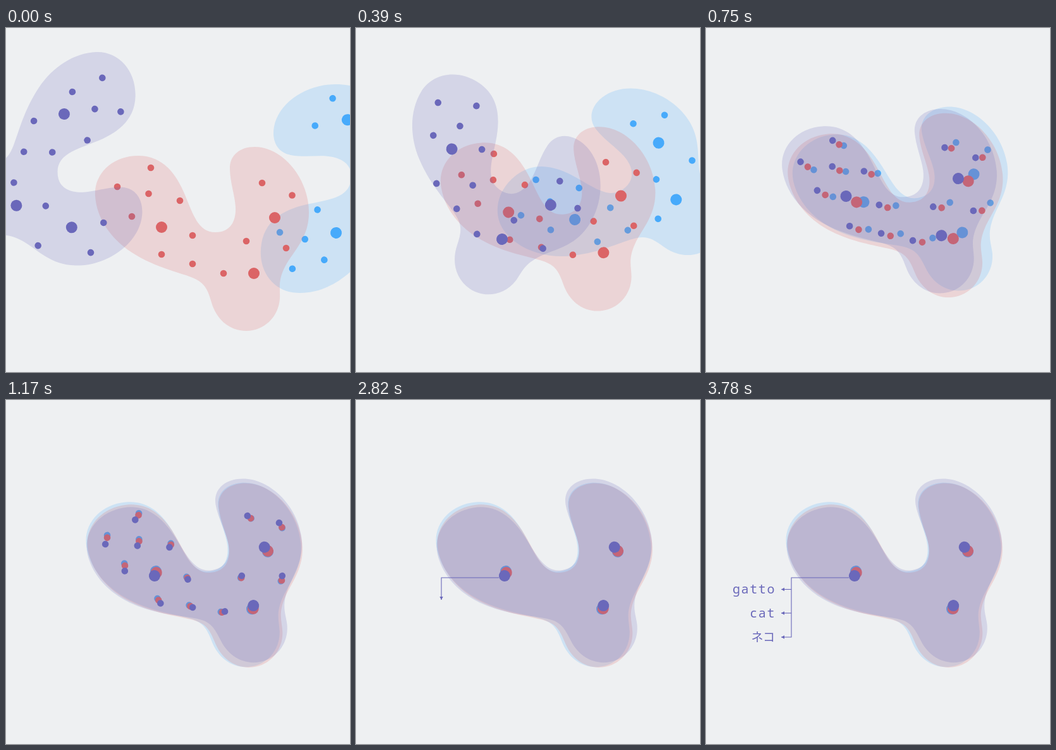
An HTML page for the animation above (3810 ms loop, 544 by 544 pixels).

```html
<!DOCTYPE html>
<html lang="en">
<head>
<meta charset="utf-8">
<title>Aligned spaces</title>
<style>
  html, body { margin: 0; width: 100%; height: 100%; overflow: hidden; background: #eef0f2; }
  svg { display: block; width: 100vw; height: 100vh; }
  text { fill: #6a68ba; text-anchor: end; font: 20px "Noto Sans Mono", monospace; letter-spacing: 1.6px; }
  .jp { font: 19px "Noto Sans CJK JP", "Noto Sans CJK", sans-serif; letter-spacing: 0; }
</style>
</head>
<body>
<svg id="stage" viewBox="0 0 544 544"></svg>
<script>
const LOOP = 3810, STEP = 30, MERGE = 960;
const INK = '#6a68ba';
const stage = document.getElementById('stage');

const OUTLINE = 'M141 265C139 231 168 202 209 202S270 233 283 264S304 323 331 323' +
  'S364 301 363 283S354 243 354 222S370 188 393 188C438 188 479 238 479 292' +
  'C479 332 455 352 442 376S434 412 433 428C431 457 408 479 380 479' +
  'S332 459 325 434S312 401 290 393S233 377 199 355S143 300 141 265Z';

// Small dots sit in slanted rows: start, step, count
const ROWS = [
  { x: 229, y: 221, dx: 0, dy: 0, n: 1 },
  { x: 176, y: 251, dx: 49.5, dy: 11, n: 3 },
  { x: 199, y: 298, dx: 96, dy: 30, n: 2 },
  { x: 246, y: 358, dx: 49, dy: 15, n: 3 },
  { x: 380, y: 337, dx: 63, dy: 11, n: 2 },
  { x: 405, y: 245, dx: 47.5, dy: 19.5, n: 2 }
];
const SMALL = ROWS.flatMap(r =>
  Array.from({ length: r.n }, (_, i) => [r.x + i * r.dx, r.y + i * r.dy]));
const BIG = [[246, 315], [392, 388], [425, 300]];

// Outline, big dots and small dots each turn about their own centre
const CENTRE = { body: [304, 326], big: [334.3, 332.4], small: [309.4, 305] };

// turn: start and end angle; parts: start and end of each centre
const BLOBS = [
  { color: '#47aafb', turn: [-79.5, -5.2], parts: {
    body: [[543.4, 269], [295, 276.5]],
    big: [[555.2, 240.3], [326.5, 280.2]],
    small: [[530.3, 259.4], [297.8, 255.6]] } },
  { color: '#db6466', turn: [0, -6.2], parts: {
    body: [[304, 326], [298, 278.7]],
    big: [[334.3, 332.4], [327.4, 280.8]],
    small: [[309.4, 305], [298.5, 257]] } },
  { color: INK, turn: [91, -9.8], parts: {
    body: [[79, 200], [300, 276.5]],
    big: [[73, 224], [324.9, 280.1]],
    small: [[96, 211.3], [297.8, 258.5]] } }
];

const LABELS = [
  { word: 'gatto', y: 299.5, base: 306, branch: 3250, start: 3370 },
  { word: 'cat', y: 337, base: 343.5, branch: 3100, start: 3210 },
  { word: 'ネコ', y: 375, base: 382, start: 3060, cls: 'jp' }
];

const ramp = (t, a, b) => Math.max(0, Math.min(1, (t - a) / (b - a)));
const lerp = (a, b, p) => a + (b - a) * p;

// Leaves at speed and lands softly
const glide = u => 1 - (1 - u) ** 2 * (1 + u - u * u);

function add(parent, tag, attrs = {}) {
  const el = document.createElementNS('http://www.w3.org/2000/svg', tag);
  for (const k in attrs) el.setAttribute(k, attrs[k]);
  parent.appendChild(el);
  return el;
}

function addDots(parent, dots, r) {
  for (const [cx, cy] of dots) add(parent, 'circle', { cx, cy, r });
}

for (const b of BLOBS) {
  const group = add(stage, 'g', { fill: b.color });
  b.body = add(group, 'path', { d: OUTLINE, opacity: .2 });
  b.small = add(group, 'g');
  b.big = add(group, 'g');
  addDots(b.small, SMALL, 5.3);
  addDots(b.big, BIG, 9);
}

function makeArrow() {
  return {
    line: add(stage, 'path', { fill: 'none', stroke: INK, 'stroke-width': 1.1 }),
    head: add(stage, 'path', { d: 'M0 0L-5 -2.7V2.7Z', fill: INK })
  };
}

// Draws the first len pixels of a polyline, with the head at its tip
function drawArrow(arrow, pts, len) {
  const show = len > 0 ? 'inline' : 'none';
  arrow.line.style.display = arrow.head.style.display = show;
  let [x, y] = pts[0], d = `M${x} ${y}`, turn = 0;
  for (let i = 1; i < pts.length && len > 0; i++) {
    const dx = pts[i][0] - x, dy = pts[i][1] - y;
    const size = Math.hypot(dx, dy), k = Math.min(1, len / size);
    x += dx * k;
    y += dy * k;
    len -= size;
    turn = Math.atan2(dy, dx) * 180 / Math.PI;
    d += `L${x} ${y}`;
  }
  arrow.line.setAttribute('d', d);
  arrow.head.setAttribute('transform', `translate(${x} ${y}) rotate(${turn})`);
}

const STEM = [[226, 281], [135, 281], [135, 375], [119, 375]];
const stem = makeArrow();
for (const l of LABELS) {
  if (l.branch) l.arrow = makeArrow();
  l.text = add(stage, 'text', { x: l.cls ? 109 : 110, y: l.base, class: l.cls || '' });
  l.text.textContent = l.word;
}

function draw(t) {
  const p = glide(ramp(t, 0, MERGE));
  for (const b of BLOBS) {
    const angle = lerp(...b.turn, p);
    for (const name in b.parts) {
      const [from, to] = b.parts[name], [cx, cy] = CENTRE[name];
      const x = lerp(from[0], to[0], p), y = lerp(from[1], to[1], p);
      b[name].setAttribute('transform',
        `translate(${x} ${y}) rotate(${angle}) translate(${-cx} ${-cy})`);
    }
    b.small.setAttribute('fill-opacity', 1 - ramp(t, 1500, 2100));
  }
  drawArrow(stem, STEM, 201 * ramp(t, 2340, 3105));
  for (const l of LABELS) {
    if (l.arrow) drawArrow(l.arrow, [[135, l.y], [119, l.y]], 16 * ramp(t, l.branch, l.branch + 120));
    const s = ramp(t, l.start, l.start + 400);
    l.text.setAttribute('opacity', s);
    l.text.setAttribute('transform', `translate(${18 * (1 - s) ** 2} 0)`);
  }
}

const began = performance.now();
function tick() {
  const t = (performance.now() - began) % LOOP;
  draw(Math.floor(t / STEP) * STEP);
  requestAnimationFrame(tick);
}
draw(0);
requestAnimationFrame(tick);
</script>
</body>
</html>
```
